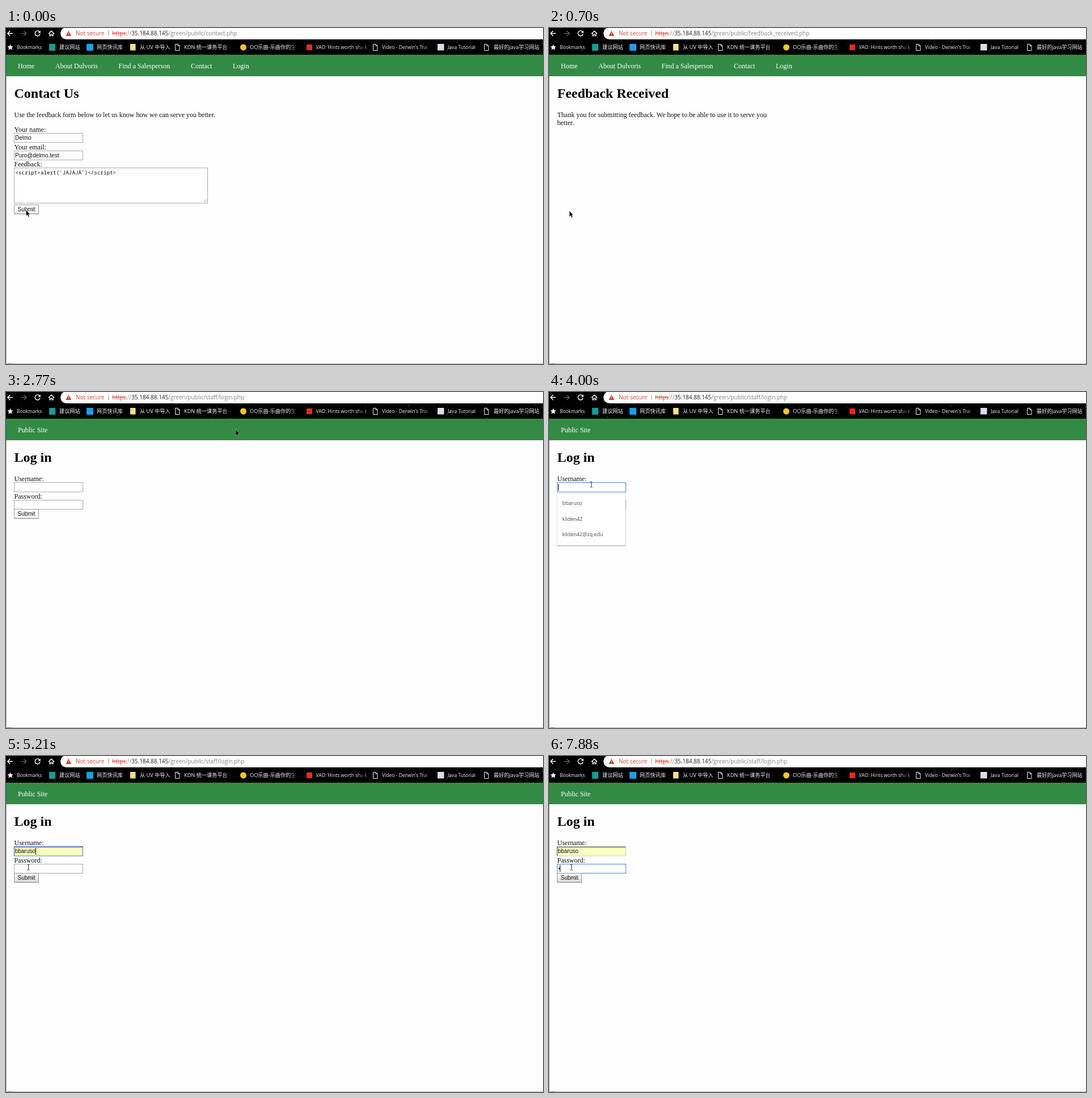
Write an HTML page that moves like this. It is 947 px wide and 592 px high and loops after 8 s.

```html
<!DOCTYPE html>
<html lang="en">
<head>
<meta charset="utf-8">
<title>Feedback and login</title>
<style>
  html, body { margin: 0; width: 100%; height: 100%; overflow: hidden; background: #fefefe; }
  svg { display: block; width: 947px; height: 592px; }
  text { white-space: pre; }
  .ui { font: 10px "Open Sans", "Noto Sans CJK SC", "Noto Sans CJK", sans-serif; }
  .page { font: 12px "Liberation Serif", serif; fill: #111; }
  .head { font: bold 24px "Liberation Serif", serif; fill: #000; }
  .field { font: 10px "Liberation Sans", sans-serif; fill: #111; }
  .code { font: 9.25px "Noto Sans Mono", monospace; fill: #111; }
  .mark { fill: #f4f4f4; }
</style>
</head>
<body>
<svg id="stage" viewBox="0 0 947 592"></svg>
<script>
const LOOP = 8000;
const stage = document.getElementById('stage');

const text = (cls, x, y, str, extra = '') => `<text class="${cls}" x="${x}" y="${y}" ${extra}>${str}</text>`;
const rect = (x, y, w, h, fill, extra = '') =>
  `<rect x="${x}" y="${y}" width="${w}" height="${h}" fill="${fill}" ${extra}/>`;
const line = (d, stroke, width = 1, extra = '') =>
  `<path d="${d}" fill="none" stroke="${stroke}" stroke-width="${width}" ${extra}/>`;
const group = (id, body) => `<g id="${id}">${body}</g>`;
const box = (y, w = 121, h = 16, id = '') =>
  rect(14.5, y, w, h, '#fff', `stroke="#a9a9a9" ${id && `id="${id}"`}`);
const nav = items => items.map(([x, s]) => text('page', x, 70.5, s, 'style="fill:#fff"')).join('');
const button = (id, y) =>
  rect(14.5, y, 43, 16, '#fdfdfd', `id="${id}" stroke="#999"`) +
  line(`M15 ${y + 16}H58`, '#777') +
  text('field', 20.5, y + 11.5, 'Submit');
const doc = x => line(`M${x} 28.5h4.5l3 3v8h-7.5zM${x + 4.5} 28.5v3h3`, '#eee');

function stars() {
  let seed = 17, out = '';
  const rnd = () => (seed = seed * 16807 % 2147483647) / 2147483647;
  for (let i = 0; i < 150; i++) {
    const x = i % 3 ? rnd() * 947 : 947 - rnd() ** 2 * 300;
    const y = rnd() * 46;
    const glow = 0.15 + rnd() ** 2 * 0.7;
    out += rect(x.toFixed(1), y.toFixed(1), 1, 1, '#fff', `opacity="${glow.toFixed(2)}"`);
  }
  return out;
}

function bookmarks() {
  const cjk = 9.2, latin = 8.6;
  const items = [
    [19, 'Bookmarks', 8.4], [94, '建议网站', cjk], [160, '网页快讯库', cjk],
    [236, '从 UV 中导入', cjk], [314, 'KDN 统一课务平台 -', cjk],
    [430, 'OO乐曲-乐曲你的生', cjk], [546.5, 'VAO: Hints worth shari', 8.5],
    [663, "Video - Derwin's Trai", latin], [779, 'Java Tutorial', latin],
    [860, '最好的java学习网站', 9.1]
  ];
  const fades = [385, 500, 620, 735].map(x => rect(x, 26, 14, 16, 'url(#fade)')).join('');
  return items.map(([x, s, size]) => text('ui mark', x, 37, s, `style="font-size:${size}px"`)).join('') +
    fades +
    `<path d="M7.500 28.800l1.500 3.400 3.600.4-2.700 2.500.8 3.600-3.200-1.900-3.200 1.900.8-3.600-2.700-2.500 3.600-.4z" fill="#fff"/>` +
    rect(76, 28, 11, 12, '#1a9a96') +
    rect(142, 28, 12, 12, '#19a0e8') +
    rect(219, 28, 9.5, 11.5, '#f8df8b') +
    doc(298.5) +
    `<circle cx="418.500" cy="34" r="5.500" fill="#f0c52c"/>` +
    rect(530, 29, 10, 10, '#e62b1e') +
    doc(647.5) + rect(761, 28, 11.5, 11.5, '#dcdcec') + doc(843.5);
}

const toolbar =
  rect(0, 0, 947, 47, '#000') + bookmarks() + stars() +
  rect(96, -1, 900, 21, '#fefefe', 'rx="10.5"') +
  line('M12 9.500H3M7.300 5L2.800 9.500l4.500 4.500', '#fff', 1.4) +
  line('M27 9.500h8.500M31.500 5.300l4.200 4.200-4.200 4.200', '#777', 1.2) +
  group('reload', line('M59.300 6.800A4.500 4.500 0 1 0 60 10.500', '#fff', 1.4) +
    '<path d="M60.800 4.500v4.300h-4.300z" fill="#fff"/>') +
  group('stop', line('M51.500 5.500l8.500 8.500M60 5.500l-8.500 8.500', '#fff', 1.4)) +
  line('M75 10l5-4.800 5 4.800M76.800 9v5h2v-3h2.400v3h2v-5', '#fff', 1.2) +
  '<path d="M110.300 5l5 9h-10z" fill="#d5362b"/>' +
  line('M110.300 8v2.600M110.300 11.500v1.200', '#fff', 0.9) +
  text('ui', 123, 13.2, 'Not secure', 'fill="#d5463c"') +
  line('M181 4.500v10', '#999') +
  `<text class="ui" x="187" y="13.200" fill="#80868b"><tspan fill="#d5463c" text-decoration="line-through">https</tspan>://<tspan fill="#222">35.184.88.145</tspan><tspan id="path"></tspan></text>`;

const publicNav = nav([[21, 'Home'], [87, 'About Dulvoris'], [198.5, 'Find a Salesperson'], [326, 'Contact'], [400, 'Login']]);

const contact =
  text('head', 14.5, 123, 'Contact Us') +
  text('page', 14.5, 156.5, 'Use the feedback form below to let us know how we can serve you better.') +
  text('page', 14.5, 182.5, 'Your name:') + box(185.5) + text('field', 16, 197, 'Delmo') +
  text('page', 14.5, 213.5, 'Your email:') + box(216.5) + text('field', 16, 227.5, 'Puro@delmo.test') +
  text('page', 14.5, 243.5, 'Feedback:') + box(246.5, 341, 62) +
  text('code', 16.5, 257.8, "&lt;script&gt;alert('JAJAJA')&lt;/script&gt;") +
  line('M349 306.500l5-5M352 306.500l2-2', '#999') +
  button('send', 311.5);

const received =
  text('head', 14.5, 123, 'Feedback Received') +
  text('page', 14.5, 156.5, 'Thank you for submitting feedback. We hope to be able to use it to serve you') +
  text('page', 14.5, 170.5, 'better.');

const login =
  nav([[21, 'Public Site']]) +
  text('head', 14.5, 123, 'Log in') +
  text('page', 14.5, 156.5, 'Username:') + box(159.5, 121, 16.5, 'user') +
  line('M14.500 176V160.500H135', '#777', 1.6, 'id="inset"') +
  text('field', 15.7, 171, 'bbaruso', 'id="name"') +
  text('page', 14.5, 187.5, 'Password:') + box(190.5, 121, 16, 'pass') +
  '<circle id="dot" cx="18" cy="198" r="1.600" fill="#111"/>' +
  button('enter', 206.5) +
  group('menu',
    rect(14, 177.5, 121.5, 94.5, '#000', 'rx="2" opacity=".12"') +
    rect(14, 177, 121, 93.5, '#fff', 'rx="2" stroke="#ccc" stroke-width=".7"') +
    line('M15 270.700H134.500', '#aaa', 0.8) +
    rect(14.5, 182, 120.5, 27, '#eee', 'id="hover"') +
    ['bbaruso', 'kliden42', 'kliden42@zq.edu'].map((s, i) =>
      text('ui', 23.5, 199.3 + 27.2 * i, s, 'style="font-size:9px" fill="#444"')).join('')) +
  rect(0, 0, 1, 12, '#000', 'id="caret"');

const cursors =
  group('arrow', '<path d="M0 0v10l2.300-2.100 1.700 3.800 1.700-.8-1.600-3.600h3z" fill="#000" stroke="#ddd" stroke-width=".5"/>') +
  group('hand', '<path d="M2.700 7V1.300q1-1.400 2 0V4.500l4 .8q1.300.5 1.200 2L9.300 11v2H3.800v-1.500L.6 8q-.4-1.600 1-1.400z" fill="#fff" stroke="#111" stroke-width=".9"/>' +
    line('M6.400 5v2.500M8.100 5.400v2.200', '#111', 0.6)) +
  group('beam', line('M-2 -4.500h1.500l.5.500.5-.500h1.500M0 -4V4.500M-2 5h1.500l.5-.500.5.500h1.500', '#222', 0.9));

stage.innerHTML =
  '<defs><linearGradient id="fade"><stop offset="0" stop-opacity="0"/><stop offset="1"/></linearGradient>' +
  '<linearGradient id="grey" x2="0" y2="1"><stop stop-color="#f6f6f6"/><stop offset="1" stop-color="#dcdcdc"/></linearGradient></defs>' +
  rect(0, 0, 947, 592, '#fefefe') + toolbar + rect(0, 47, 947, 38, '#338a45') +
  line('M.5 85V592M0 591.500H947', '#aaa') + line('M3 591.500h7', '#666') +
  group('publicNav', publicNav) + group('contact', contact) + group('received', received) +
  group('login', login) + cursors;

const el = {};
stage.querySelectorAll('[id]').forEach(node => el[node.id] = node);
const show = (id, on) => el[id].setAttribute('display', on ? 'inline' : 'none');
const set = (id, attrs) => Object.entries(attrs).forEach(([k, v]) => el[id].setAttribute(k, v));
const within = (t, a, b) => t >= a && t < b;
const latest = (steps, t) => steps.filter(s => s[0] <= t).pop();

const pointer = [
  [0, 'arrow', 35.5, 321], [160, 'arrow', 36, 322.5], [1110, 'arrow', 47, 318],
  [1260, 'arrow', 288, 186], [1410, 'arrow', 330, 136], [1690, 'arrow', 371, 102],
  [1810, 'arrow', 400.5, 76], [1960, 'hand', 410, 63.5], [2240, 'hand', 410, 64.5],
  [2770, 'arrow', 405, 66.5], [2900, 'arrow', 360, 83], [3020, 'arrow', 225, 122],
  [3170, 'arrow', 130, 147], [3290, 'beam', 74.5, 162.5], [4530, 'arrow', 56, 183],
  [4660, 'arrow', 38, 191], [5210, 'beam', 39.5, 196]
];
const caret = [
  [0], [4000, 16, 162], [4530], [5070, 16, 162], [5210, 52, 162], [5740],
  [5880, 16, 193], [6440], [6870, 16, 193], [7460], [7880, 19, 192]
];
const paths = [[0, 'contact'], [700, 'feedback_received'], [2770, 'staff/login']];

function render(t) {
  const page = latest(paths, t)[1];
  el.path.textContent = `/green/public/${page}.php`;
  show('contact', t < 700);
  show('received', within(t, 700, 2770));
  show('publicNav', t < 2770);
  show('login', t >= 2770);

  const loading = within(t, 580, 700) || within(t, 2370, 2770);
  show('stop', loading);
  show('reload', !loading);
  set('send', { fill: within(t, 440, 580) ? '#ddd' : '#fdfdfd' });

  const filled = t >= 4660;
  const userFocus = within(t, 4000, 5880);
  set('user', { fill: filled ? '#faffbd' : '#fff', stroke: userFocus ? '#4a86d8' : filled ? '#ccc' : '#a9a9a9' });
  set('pass', { stroke: t >= 5880 ? '#4a86d8' : '#a9a9a9' });
  set('inset', { stroke: userFocus ? '#6b88aa' : '#777' });
  show('inset', filled);
  show('name', filled);
  show('dot', t >= 7880);
  show('menu', within(t, 4000, 5210));
  show('hover', filled);
  set('enter', { fill: t < 5210 ? '#fdfdfd' : 'url(#grey)' });

  const [, cx, cy] = latest(caret, t);
  show('caret', cx !== undefined);
  if (cx !== undefined) set('caret', { x: cx, y: cy });

  const [, kind, x, y] = latest(pointer, t);
  for (const id of ['arrow', 'hand', 'beam']) show(id, id === kind);
  set(kind, { transform: `translate(${x} ${y})` });
}

const start = performance.now();
function tick() {
  render((performance.now() - start) % LOOP);
  requestAnimationFrame(tick);
}
tick();
</script>
</body>
</html>
```
